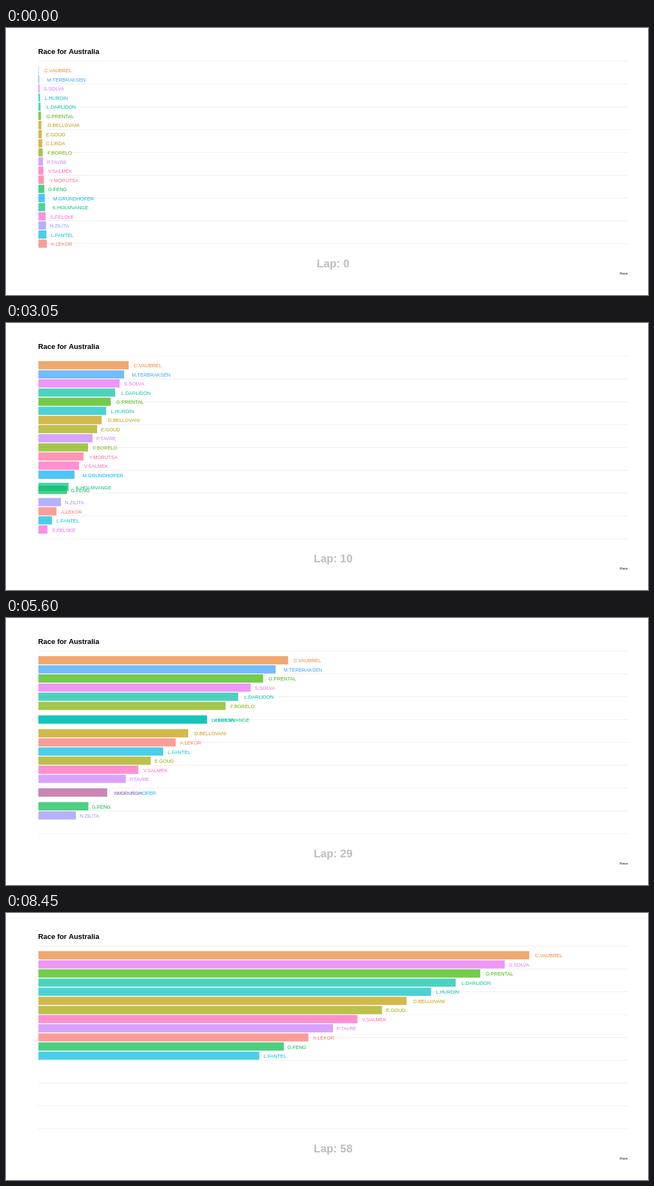
Write an HTML page with a canvas that moves like this. It is 1159 px wide and 483 px high and loops after 10000 ms.

```html
<!DOCTYPE html>
<html lang="en">
<head>
<meta charset="utf-8">
<title>Race for Australia</title>
<style>
html, body { margin: 0; width: 100%; height: 100%; overflow: hidden; background: #fff; }
canvas { display: block; }
</style>
</head>
<body>
<canvas id="stage" width="1159" height="483"></canvas>
<script>
const ctx = document.getElementById('stage').getContext('2d');
const FONT = '"Liberation Sans", Arial, sans-serif';

const LOOP = 10000, STEP = 50, PAUSE = 30, LAST = 139;
const LEFT = 58.5, RIGHT = 1122.5, TOP = 59.9, ROW = 16.51, UNIT = 0.764;
const BAR = 0.9 * ROW;

// Drivers a..t, in drawing order
const drivers = [
  ['A.LEKOR', '#F8766D'], ['C.VAUBREL', '#EA8331'], ['C.LIRDA', '#D89000'],
  ['D.BELLOVANI', '#C09B00'], ['E.GOUD', '#A3A500'], ['F.BORELO', '#7CAE00'],
  ['G.PRENTAL', '#39B600'], ['G.FENG', '#00BB4E'], ['K.HOLMVANGE', '#00BF7D'],
  ['L.DARLIDON', '#00C1A3'], ['L.HURDIN', '#00BFC4'], ['L.FANTEL', '#00BAE0'],
  ['M.GRUNDHOFER', '#00B0F6'], ['M.TERBRAKSEN', '#35A2FF'], ['N.ZILITA', '#9590FF'],
  ['P.TAVRE', '#C77CFF'], ['S.SOLVA', '#E76BF3'], ['S.FELSKE', '#FA62DB'],
  ['V.SALMEK', '#FF62BC'], ['Y.MORUTSA', '#FF6A98']
].map(([name, color], i) => ({ name, color, id: String.fromCharCode(97 + i) }));

// Running order from the given lap onwards
const orders = {
  0: 'bnqkjgdecfpsthmirola',
  1: 'bnjqgkdepftsmchirola',
  2: 'bnjqgkdepftsmhirola',
  3: 'bnjqgkdepftsmhiroal',
  5: 'bnjqgkdepftsmhioarl',
  9: 'bnqjgkdepftsmhioalr',
  11: 'bnqjgkdepftsmihoalr',
  13: 'bnqjgkdepftsmioalrh',
  15: 'bnqjgkdepfsmialrtho',
  17: 'bnqjgkdefsmialrptho',
  18: 'bqjgkdnfsmialreptho',
  19: 'bqjgnfsmidkalreptho',
  20: 'bjgnfsmqidkalreptho',
  21: 'bjgnfsqidkalrepmtho',
  22: 'bgnjfqikdlarespthmo',
  23: 'bngjfqikdalespthmo',
  24: 'bngjqfikdalesptmho',
  28: 'bngqjfikdalesptmho',
  30: 'bngqjfkidalespmtho',
  33: 'bngqjfkdiaelspmtho',
  36: 'bnqgjfkdiaelspmhto',
  39: 'bqgjfkdiaelspmhto',
  40: 'bqgjkdfaelspmhtio',
  41: 'bqgjkdaelspmhftio',
  44: 'bqgjkdaelpsmhfito',
  47: 'bqgjkdaeplshfimto',
  49: 'bqgjkdaeplsfhimto',
  53: 'bqgjkdaepslfhimto',
  54: 'bqgjkdaepslhimtof',
  56: 'bqgjkdaesphlmitof',
  58: 'bqgjkdespahl'
};

const laps = [];
for (let lap = 0; lap <= 58; lap++) laps.push(orders[lap] || laps[lap - 1]);

const lerp = (a, b, f) => a + (b - a) * f;

// Laps take two steps, except laps 1 to 23, which take three
function lapAt(step) {
  if (step < 2) return step / 2;
  return step < 71 ? 1 + (step - 2) / 3 : 24 + (step - 71) / 2;
}

function standing(id, lap) {
  const rank = laps[lap].indexOf(id) + 1;
  return rank && { rank, value: lap ? lap * (21 - rank) : rank };
}

function pose(driver, progress) {
  const lap = Math.floor(progress), f = progress - lap;
  const from = standing(driver.id, lap);
  const to = f ? standing(driver.id, lap + 1) : from;
  if (!from || !to) return null;
  return {
    name: driver.name,
    color: driver.color,
    y: TOP + ROW * lerp(from.rank, to.rank, f),
    width: UNIT * lerp(from.value, to.value, f)
  };
}

function text(str, x, y, font, color, align = 'left') {
  ctx.font = font + ' ' + FONT;
  ctx.fillStyle = color;
  ctx.textAlign = align;
  ctx.fillText(str, x, y);
}

function draw(time) {
  const step = Math.floor((time % LOOP) / STEP) - PAUSE;
  const progress = lapAt(Math.min(Math.max(step, 0), LAST));

  ctx.fillStyle = '#fff';
  ctx.fillRect(0, 0, 1159, 483);

  ctx.fillStyle = '#ebebeb';
  for (let i = 0; i < 9; i++) {
    ctx.fillRect(LEFT, TOP + ROW * 2.5 * i - 0.4, RIGHT - LEFT, 1);
  }

  const bars = drivers.map(d => pose(d, progress)).filter(Boolean);

  ctx.globalAlpha = 0.7;
  for (const b of bars) {
    ctx.fillStyle = b.color;
    ctx.fillRect(LEFT, b.y - BAR / 2, b.width, BAR);
  }
  ctx.globalAlpha = 1;

  for (const b of bars) {
    ctx.font = '8.9px ' + FONT;
    const gap = 0.2 * ctx.measureText(b.name).width;
    text(b.name, Math.round(LEFT + b.width + gap), Math.round(b.y + 4), '8.9px', b.color);
  }

  text('Race for Australia', 58, 47, 'bold 12.9px', '#000');
  text('Lap: ' + Math.floor(progress), 590.5, 433, 'bold 20px', '#bebebe', 'center');
  text('Race', 1122.5, 446, '6.2px', '#000', 'right');
}

let start;
function tick(now) {
  if (start === undefined) start = now;
  draw(now - start);
  requestAnimationFrame(tick);
}
requestAnimationFrame(tick);
</script>
</body>
</html>
```
